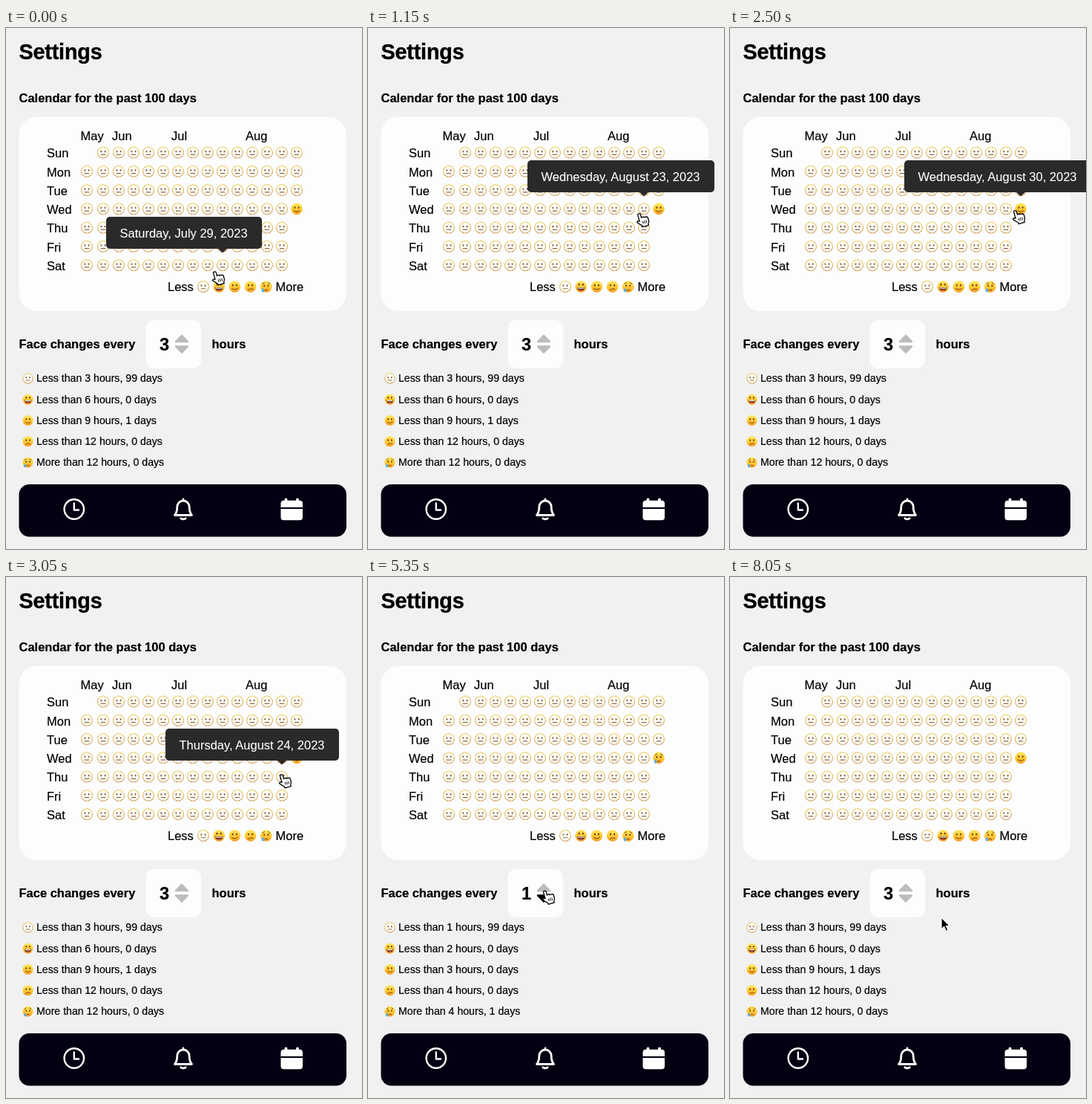
Animation, 480 px wide and 701 px high, one loop 8.1 s. Source, as an HTML page:

```html
<!DOCTYPE html>
<html lang="en">
<head>
<meta charset="utf-8">
<title>Settings</title>
<style>
  html, body { margin: 0; width: 100%; height: 100%; overflow: hidden; background: #f1f1f1; }
  svg { display: block; }
  text { font: 16.5px "Liberation Sans", Arial, sans-serif; white-space: pre; stroke: #000; stroke-width: .2; }
  .bold { font-weight: bold; }
  .title { font-size: 28.8px; letter-spacing: -.2px; stroke-width: .4; }
  .count { font-size: 23.6px; }
  .small { font-size: 14.15px; }
  #tipText { fill: #fff; stroke: #fff; stroke-width: .1; }
  .line { fill: none; stroke-linecap: round; stroke-linejoin: round; }
</style>
</head>
<body>
<svg width="480" height="701" viewBox="0 0 480 701">
  <defs>
    <linearGradient id="skin" x2="0" y2="1">
      <stop stop-color="#ffe75e"/><stop offset=".55" stop-color="#ffc933"/><stop offset="1" stop-color="#f59a22"/>
    </linearGradient>
    <linearGradient id="rim" x2="0" y2="1">
      <stop stop-color="#e6c034"/><stop offset="1" stop-color="#bd7f2a"/>
    </linearGradient>
    <g id="eyes"><ellipse cx="-2.6" cy="-1.8" rx="1" ry="1.4"/><ellipse cx="2.6" cy="-1.8" rx="1" ry="1.4"/></g>
    <g id="face0">
      <circle r="7.4" fill="#fffdf6" stroke="url(#rim)" stroke-width="1.2" pathLength="54" stroke-dasharray="2 1"/>
      <use href="#eyes" y=".4" fill="#86694e"/>
      <path class="line" d="M-2.8 2.8H2.8" stroke="#86694e" stroke-width="1.1"/>
    </g>
    <g id="face1">
      <circle r="7.8" fill="url(#skin)"/><use href="#eyes" y="-1" fill="#5d3310"/>
      <path d="M-5.2 .6Q0 2 5.2 .6Q4.6 6 0 6T-5.2 .6Z" fill="#5d2a10"/>
      <path d="M-4.5 1.1Q0 2.2 4.5 1.1L4 2.5Q0 3.2-4 2.5Z" fill="#fff"/>
      <ellipse cy="4.9" rx="2.2" ry=".9" fill="#e8515b"/>
    </g>
    <g id="face2">
      <circle r="7.8" fill="url(#skin)"/><use href="#eyes" fill="#6b3b10"/>
      <path class="line" d="M-4 2.3Q0 5.6 4 2.3" stroke="#6b3b10"/>
    </g>
    <g id="face3">
      <circle r="7.8" fill="url(#skin)"/><use href="#eyes" fill="#6b3b10"/>
      <path class="line" d="M-3.2 4.4Q-.5 2 3.4 3.2" stroke="#6b3b10"/>
    </g>
    <g id="face4">
      <circle r="7.8" fill="url(#skin)"/><use href="#eyes" y=".6" fill="#6b3b10"/>
      <path class="line" d="M-2 4.8Q0 3 2 4.8M-4.8-3.8Q-3.6-4.4-2.4-5.2M4.8-3.8Q3.6-4.4 2.4-5.2" stroke="#6b3b10"/>
      <path d="M-4.4 1.6Q-6.2 4.4-6.2 5.6A1.8 1.8 0 0 0-2.6 5.6Q-2.6 4.4-4.4 1.6Z" fill="#58aee8"/>
    </g>
  </defs>

  <rect width="480" height="701" fill="#f1f1f1"/>
  <rect x="17.5" y="119.5" width="441.5" height="261.500" rx="24" fill="#fdfdfd"/>
  <rect x="188.5" y="393" width="74.500" height="65" rx="11" fill="#fdfdfd"/>
  <text class="bold title" x="17.5" y="42">Settings</text>
  <text class="bold" x="17.5" y="99.5">Calendar for the past 100 days</text>
  <text class="bold" x="17.5" y="431">Face changes every</text>
  <text class="bold" x="277.5" y="431">hours</text>
  <text x="218" y="354">Less</text>
  <text x="363.5" y="354">More</text>

  <rect x="17.5" y="614" width="441.500" height="70.500" rx="14" fill="#040012"/>
  <g class="line" stroke="#fff" stroke-width="2.4">
    <circle cx="91.8" cy="647.5" r="13.2"/>
    <path d="M91.800 639.500V648.500H98"/>
    <path stroke-width="2.800" d="M227.500 655.500Q230.800 651.500 230.800 644.500A8.200 8.500 0 0 1 247.200 644.500Q247.200 651.500 250.500 655.500ZM239 635.500V634M235.800 659.800Q239 662 242.200 659.800"/>
  </g>
  <rect x="370.500" y="635.800" width="29.500" height="26.400" rx="4" fill="#fff"/>
  <path class="line" d="M377.500 634.500V638M393 634.500V638" stroke="#fff" stroke-width="3.800"/>
  <path d="M370 646H400.500" stroke="#040012" stroke-width="2.200"/>

  <g id="grid"></g>
  <g id="live"></g>
  <path id="up" class="line" stroke-width="2.5" d="M229 422H245L237 413.800Z"/>
  <path id="down" class="line" stroke-width="2.5" d="M229 428.500H245L237 436.700Z"/>
  <g id="tip">
    <rect id="tipBox" height="43" rx="5" fill="#2a2a2a"/>
    <path d="M150.500 42.500H163.500L157 48.500Z" fill="#2a2a2a"/>
    <text id="tipText" x="18.500" y="28"></text>
  </g>
  <g id="hand" stroke="#000" stroke-width="1.4" stroke-linejoin="round">
    <g transform="translate(-1.500 0) rotate(-16) scale(.93)">
      <path fill="#fff" d="M-2 11V1.500Q-2 0 0 0T2 1.500V7Q2.500 5.800 4 6T5.500 7.500Q7 6.300 8.300 7.600Q10 7 11 9V13Q11 16 9 18V20H0V18Q-4 14.500-6 11.500Q-5 9-2 11Z"/>
      <path stroke-width="1" d="M2.300 12V16M4.800 12V16M7.300 12V16"/>
    </g>
  </g>
  <path id="arrow" d="M0 0V16L3.700 12.500L6.200 18.500L9 17.300L6.500 11.600H11.300Z" stroke="#fff" stroke-width="1.200"/>
</svg>
<script>
const LOOP = 8100, STEP = 50;
const el = id => document.getElementById(id);
const text = (x, y, s, cls = '') => `<text class="${cls}" x="${x}" y="${y}">${s}</text>`;
const face = (i, x, y, scale = 1) =>
  `<use href="#face${i}" transform="translate(${x} ${y}) scale(${scale})"/>`;

// Calendar geometry: columns are weeks, rows are weekdays
const colX = c => c < 2 ? 109 + 22 * c : 112 + 20 * c;
const rowY = r => 167.6 + 25.25 * r;
const hasDay = (c, r) => c >= 0 && c < 15 && r >= 0 && r < 7 && c + r > 0 && !(c === 14 && r > 3);

// Pointer path: time, x, y
const path = [
  [0, 282.5, 328], [400, 392, 246], [800, 340, 267], [1300, 374, 245],
  [1750, 377.5, 227], [2200, 372, 244], [2600, 388, 246], [3050, 372.5, 266],
  [3900, 262, 398], [4300, 238, 428], [4800, 239, 429], [5350, 239.5, 422.5],
  [5800, 240, 417], [6650, 240, 416.5], [7000, 240, 428], [7500, 239, 429], [8050, 285, 458]
];
// Interval changes: time, hours
const clicks = [[0, 3], [4600, 2], [5000, 1], [5850, 2], [6150, 3], [6450, 4], [7400, 3]];

function pointerAt(t) {
  const i = path.findIndex(p => p[0] > t);
  if (i < 0) return path.at(-1).slice(1);
  const [t0, x0, y0] = path[i - 1], [t1, x1, y1] = path[i];
  const u = (t - t0) / (t1 - t0), k = u * u * (3 - 2 * u);
  return [x0 + (x1 - x0) * k, y0 + (y1 - y0) * k];
}

function drawGrid() {
  let out = '';
  ['Sun', 'Mon', 'Tue', 'Wed', 'Thu', 'Fri', 'Sat'].forEach((day, r) => {
    out += text(55, rowY(r) + 6.7, day);
    for (let c = 0; c < 15; c++)
      if (hasDay(c, r) && !(c === 14 && r === 3)) out += face(0, colX(c), rowY(r));
  });
  [['May', 100.5], ['Jun', 143], ['Jul', 223], ['Aug', 323]].forEach(([m, x]) => out += text(x, 150.5, m));
  for (let i = 0; i < 5; i++) {
    out += face(i, 266 + 21.2 * i, 348);
    out += face(i, 29.5, 471.5 + 28.25 * i, .9);
  }
  el('grid').innerHTML = out;
}

function drawValues(hours) {
  const mood = Math.min(4, Math.floor(8.5 / hours));
  let out = text(207, 434, hours, 'bold count') + face(mood, 392, rowY(3));
  for (let i = 0; i < 5; i++) {
    const limit = hours * Math.min(i + 1, 4);
    const days = i === 0 ? 99 : +(i === mood);
    out += text(41, 476.3 + 28.25 * i,
      `${i < 4 ? 'Less' : 'More'} than ${limit} hours, ${days} days`, 'small');
  }
  el('live').innerHTML = out;
}

function drawTip(c, r) {
  const date = new Date(2023, 4, 21 + 7 * c + r);
  el('tipText').textContent = date.toLocaleDateString('en-US',
    { weekday: 'long', month: 'long', day: 'numeric', year: 'numeric' });
  el('tipBox').setAttribute('width', el('tipText').getComputedTextLength() + 38);
  el('tip').setAttribute('transform', `translate(${colX(c) - 157} ${Math.round(rowY(r) - 65)})`);
}

const show = (id, on) => el(id).style.display = on ? '' : 'none';
const tint = (id, on) => {
  el(id).style.fill = el(id).style.stroke = on ? '#000' : '#bcbcbc';
};

function draw(t) {
  const [x, y] = pointerAt(t);
  const c = Math.round((x - 112) / 20), r = Math.round((y - rowY(0)) / 25.25);
  const onDay = hasDay(c, r);
  const onSpinner = x > 225 && x < 249 && y > 409 && y < 441;
  const hand = onSpinner || onDay && !(t >= 700 && t <= 900);

  drawValues(clicks.findLast(k => k[0] <= t)[1]);
  show('tip', onDay);
  if (onDay) drawTip(c, r);
  tint('up', onSpinner && y < 421);
  tint('down', onSpinner && y >= 421);
  show('hand', hand);
  show('arrow', !hand);
  el(hand ? 'hand' : 'arrow').setAttribute('transform', `translate(${x} ${y})`);
}

let last = -1;
function tick() {
  const t = Math.floor(performance.now() % LOOP / STEP) * STEP;
  if (t !== last) draw(last = t);
  requestAnimationFrame(tick);
}
drawGrid();
tick();
</script>
</body>
</html>
```
